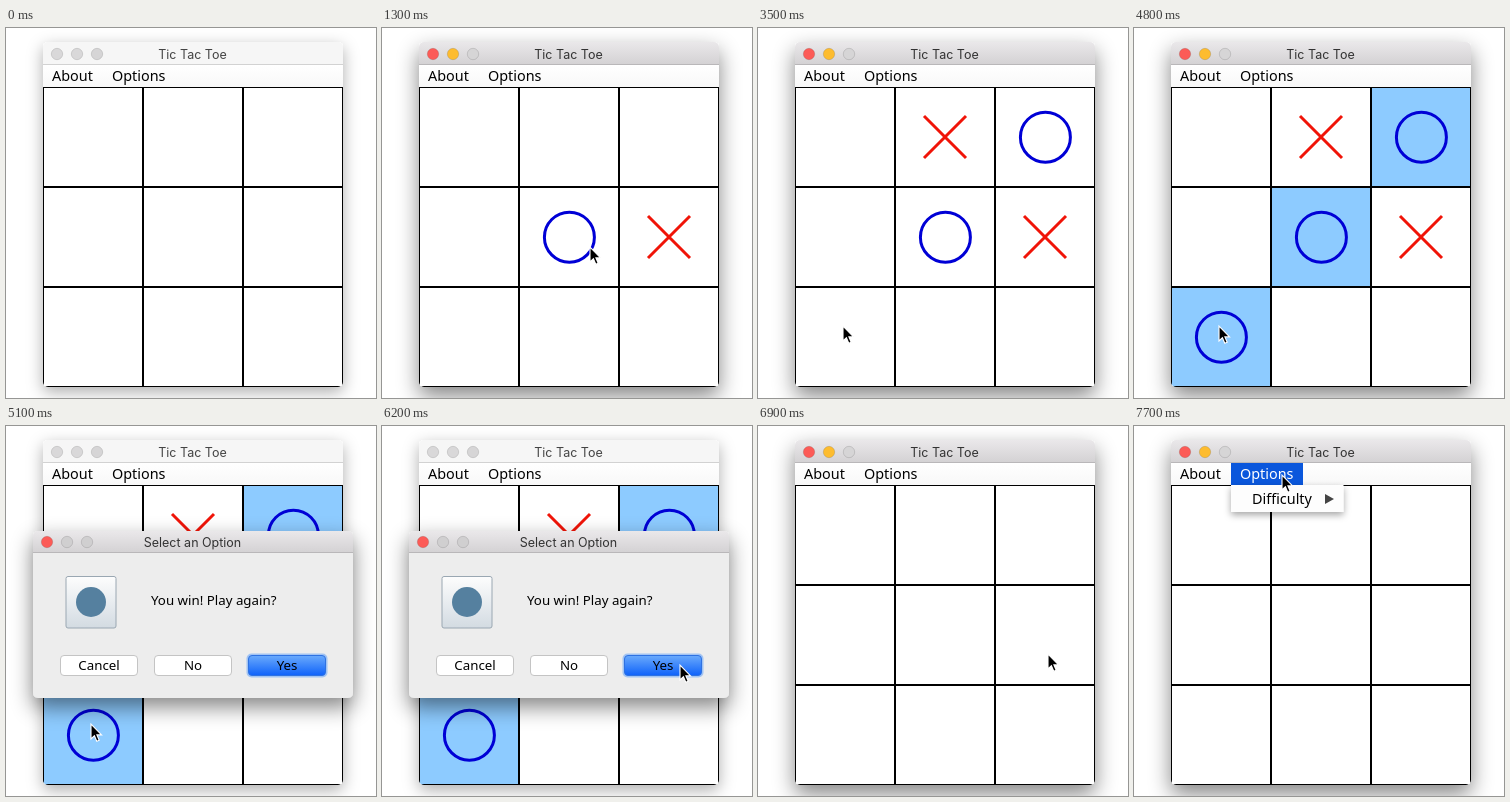
Recreate the animation shown at these times as an HTML page. Size 370x370 px, loop 8000 ms.

```html
<!DOCTYPE html>
<html lang="en">
<head>
<meta charset="utf-8">
<title>Tic Tac Toe</title>
<style>
  html, body { margin: 0; width: 100%; height: 100%; overflow: hidden; background: #fff; }
  svg { display: block; width: 100vw; height: 100vh; }
  text { font-family: "Noto Sans", "Open Sans", sans-serif; font-size: 13.3px; font-weight: 500; }
  .title { font: 400 12.5px Inter, sans-serif; fill: #333; text-anchor: middle; }
  .menu { font-size: 14.4px; }
  .mid { text-anchor: middle; }
  .o { fill: none; stroke: #0000d6; stroke-width: 3; }
  .x { fill: none; stroke: #f01408; stroke-width: 3; }
  .lamp { stroke: #000; stroke-opacity: .12; }
</style>
</head>
<body>
<svg viewBox="0 0 370 370" xmlns="http://www.w3.org/2000/svg">
  <defs>
    <linearGradient id="bar" x2="0" y2="1"><stop stop-color="#eae8ea"/><stop offset="1" stop-color="#d3d1d3"/></linearGradient>
    <linearGradient id="menuBar" x2="0" y2="1"><stop stop-color="#fff"/><stop offset="1" stop-color="#f8f8f8"/></linearGradient>
    <linearGradient id="blue" x2="0" y2="1"><stop stop-color="#6aaafc"/><stop offset="1" stop-color="#0f62fa"/></linearGradient>
    <linearGradient id="tile" x2="0" y2="1"><stop stop-color="#fdfdfd"/><stop offset="1" stop-color="#d3dbe2"/></linearGradient>
    <filter id="deep" x="-20%" y="-20%" width="140%" height="150%"><feDropShadow dx="0" dy="9" stdDeviation="10.5" flood-opacity=".48"/></filter>
    <filter id="soft" x="-20%" y="-20%" width="140%" height="150%"><feDropShadow dx="0" dy="5" stdDeviation="8" flood-opacity=".32"/></filter>
    <filter id="popup" x="-20%" y="-30%" width="140%" height="190%"><feDropShadow dx="0" dy="3" stdDeviation="3.5" flood-opacity=".35"/></filter>
    <clipPath id="frame"><rect x="37" y="14" width="300" height="345" rx="5"/></clipPath>
    <clipPath id="dialogFrame"><rect x="27" y="105" width="320" height="167" rx="5"/></clipPath>
  </defs>

  <rect width="370" height="370" fill="#fff"/>
  <rect id="base" x="37" y="14" width="300" height="345" rx="5" fill="#fff"/>
  <g clip-path="url(#frame)">
    <rect id="titleBar" x="37" y="14" width="300" height="23"/>
    <path id="titleLine" d="M37 36.5H337"/>
    <rect x="37" y="37" width="300" height="22" fill="url(#menuBar)"/>
    <g id="board"></g>
  </g>
  <g id="lamps"></g>
  <text id="title" class="title" x="186.5" y="31">Tic Tac Toe</text>
  <text class="menu" x="46" y="53">About</text>
  <rect id="menuGlow" x="97" y="37" width="72" height="22" fill="#0a57dc"/>
  <text id="options" class="menu" x="106" y="53">Options</text>
  <g id="dropdown">
    <rect x="97" y="59" width="112.5" height="27" fill="#fdfdfd" filter="url(#popup)"/>
    <text class="menu" x="118" y="78">Difficulty</text>
    <path d="M191 68V78L200 73Z" fill="#444"/>
  </g>

  <g id="dialog">
    <rect x="27" y="105" width="320" height="167" rx="5" fill="#ededed" filter="url(#deep)"/>
    <g clip-path="url(#dialogFrame)">
      <rect x="27" y="105" width="320" height="22" fill="url(#bar)"/>
      <path d="M27 126.5H347" stroke="#b9b7b9"/>
    </g>
    <g id="dialogLamps"></g>
    <text class="title" x="186.5" y="121">Select an Option</text>
    <rect x="60" y="150.500" width="50" height="51.500" rx="2" fill="url(#tile)" stroke="#9aa7b2"/>
    <circle cx="85" cy="176" r="15" fill="#55809f"/>
    <text x="145" y="179">You win! Play again?</text>
    <g id="buttons"></g>
  </g>
  <path id="cursor" d="M0 0V15L3.400 11.800 5.800 17.200 8.200 16.200 5.900 10.900H10.600Z" stroke="#fff" stroke-width="1.100"/>
</svg>

<script>
const LOOP = 8000, STEP = 100;
const $ = id => document.getElementById(id);

function add(parent, tag, attrs, text = '') {
  const el = document.createElementNS('http://www.w3.org/2000/svg', tag);
  for (const key in attrs) el.setAttribute(key, attrs[key]);
  el.textContent = text;
  parent.append(el);
  return el;
}
const show = (el, on) => { el.style.display = on ? '' : 'none'; };
const lamp = (parent, cx, cy, fill) => add(parent, 'circle', { cx, cy, r: 5.7, fill, class: 'lamp' });

const timed = []; // elements visible from one time until another
const during = (el, from, to) => timed.push({ el, from, to });

const board = $('board');
for (let i = 0; i < 9; i++) {
  const x = 37 + i % 3 * 100, y = 59 + Math.floor(i / 3) * 100;
  const size = { x, y, width: 100, height: 100 };
  add(board, 'rect', { ...size, fill: '#fff' });
  if ([2, 4, 6].includes(i)) during(add(board, 'rect', { ...size, fill: '#8dcbff' }), 4800, 6600);
  add(board, 'rect', { x: x + .5, y: y + .5, width: 99, height: 99, fill: 'none', stroke: '#000' });
}

const plays = [[4, 'o', 1000], [5, 'x', 1300], [2, 'o', 2700], [1, 'x', 2800], [6, 'o', 4400]];
for (const [cell, mark, time] of plays) {
  const cx = 87 + cell % 3 * 100, cy = 109 + Math.floor(cell / 3) * 100;
  const el = mark === 'o'
    ? add(board, 'circle', { cx: cx + .4, cy: cy + .2, r: 25, class: 'o' })
    : add(board, 'path', { d: `M${cx - 21} ${cy - 21}l42 42m0-42l-42 42`, class: 'x' });
  during(el, time, 6600);
}

const lamps = [51, 71, 91].map(x => lamp($('lamps'), x, 26, '#d6d5d6'));
['#fc5b57', '#d0cfd0', '#d0cfd0'].forEach((fill, i) => lamp($('dialogLamps'), 41 + i * 20, 116, fill));

[['Cancel', 54], ['No', 148], ['Yes', 242]].forEach(([label, x]) => {
  const main = label === 'Yes', g = $('buttons');
  if (main) add(g, 'rect', { x: x - 1.5, y: 227.5, width: 81, height: 24, rx: 5, fill: '#a2c4f3' });
  add(g, 'rect', { x: x + .5, y: 229.5, width: 77, height: 20, rx: 3.5,
    fill: main ? 'url(#blue)' : '#fff', stroke: main ? '#2f72e2' : '#c4c4c4' });
  add(g, 'text', { x: x + 39, y: 244, class: 'mid' }, label);
});

during($('dialog'), 5000, 6500);
during($('menuGlow'), 7700, LOOP);
during($('dropdown'), 7700, LOOP);
during($('cursor'), 300, LOOP);

// Pointer journeys: start time, number of steps, destination
const moves = [
  [300, 5, 208, 219], [1700, 4, 291, 98], [3100, 5, 85, 298],
  [5700, 6, 298, 239], [6900, 7, 148, 49]
];

function pointer(t) {
  let x = 221, y = 335;
  for (const [start, steps, toX, toY] of moves) {
    if (t < start) break;
    const k = Math.min(1, (Math.floor((t - start) / STEP) + 1) / steps);
    const e = k * k * (3 - 2 * k);
    x += (toX - x) * e;
    y += (toY - y) * e;
  }
  return [Math.round(x), Math.round(y)];
}

function setActive(on) {
  $('base').setAttribute('filter', on ? 'url(#deep)' : 'url(#soft)');
  $('titleBar').setAttribute('fill', on ? 'url(#bar)' : '#f6f6f6');
  $('titleLine').setAttribute('stroke', on ? '#b9b7b9' : '#d2d2d2');
  $('title').style.fill = on ? '#333' : '#444';
  lamps[0].setAttribute('fill', on ? '#fc5b57' : '#d9d8d9');
  lamps[1].setAttribute('fill', on ? '#fdbc2f' : '#d9d8d9');
}

function render(t) {
  timed.forEach(({ el, from, to }) => show(el, t >= from && t < to));
  setActive(t >= 900 && (t < 5000 || t >= 6500));
  $('options').style.fill = t >= 7700 ? '#fff' : '#000';
  $('cursor').setAttribute('transform', `translate(${pointer(t)})`);
}

const origin = performance.now();
function tick() {
  render((performance.now() - origin) % LOOP);
  requestAnimationFrame(tick);
}
tick();
</script>
</body>
</html>
```
